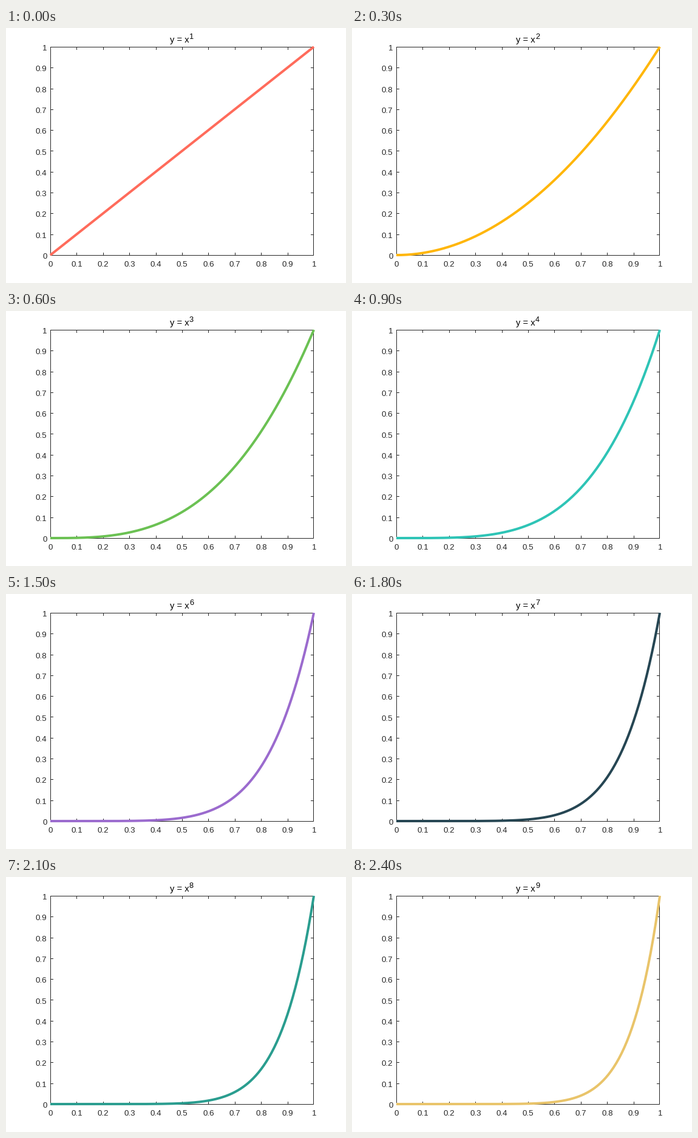
Write a matplotlib script that moves like this. It is 560 px wide and 420 px high and loops after 2.7 s.

```python
import matplotlib.pyplot as plt
import numpy as np
from matplotlib.animation import FuncAnimation

W, H, DPI = 560, 420, 100
PX = 72 / DPI  # points per pixel
LEFT, RIGHT, TOP, BOTTOM = 73, 507, 31, 374
TICK = 4.5
INK = "#262626"
COLORS = ["#ff6b5b", "#ffb60a", "#6bc153", "#2ec4b6", "#508cdc",
          "#9b6bce", "#264653", "#2a9d8f", "#e9c46a"]

plt.rcParams["font.family"] = "Liberation Sans"
fig = plt.figure(figsize=(W / DPI, H / DPI), dpi=DPI, facecolor="white")
ax = fig.add_axes([0, 0, 1, 1])
ax.set_xlim(0, W)
ax.set_ylim(H, 0)
ax.axis("off")


def stroke(xs, ys):
    ax.plot(xs, ys, color=INK, lw=PX, snap=False,
            solid_capstyle="projecting", solid_joinstyle="miter")


def label(x, y, text, size=13.33, color=INK, ha="left"):
    return ax.text(x, y, text, fontsize=size * PX, color=color,
                   ha=ha, va="baseline")


def to_pixels(x, y):
    return LEFT + (RIGHT - LEFT) * x, BOTTOM - (BOTTOM - TOP) * y


# One-pixel strokes run through pixel centres.
x0, x1, y0, y1 = LEFT + 0.5, RIGHT - 0.5, TOP + 0.5, BOTTOM + 0.5
stroke([x0, x1, x1, x0, x0], [y0, y0, y1, y1, y0])
for i in range(11):
    t = i / 10
    x, y = to_pixels(t, t)
    if 0 < i < 10:
        tx, ty = round(x) + 0.5, round(y) + 0.5
        stroke([tx, tx], [y1, y1 - TICK + 0.5])
        stroke([tx, tx], [y0, y0 + TICK - 0.5])
        stroke([x0, x0 + TICK - 0.5], [ty, ty])
        stroke([x1, x1 - TICK + 0.5], [ty, ty])
    label(x + 0.3, 393, f"{t:g}", ha="center")
    label(67.4, y + 6.05, f"{t:g}", ha="right")

label(270.4, 24, "y = x", 14.67, "black")
power = label(302, 18, "", 12.8, "black")

u = np.linspace(0, 1, 201)
curve, = ax.plot([], [], lw=4 * PX, snap=False, solid_capstyle="butt",
                 solid_joinstyle="round", zorder=3)


def update(frame):
    n = frame + 1
    curve.set_data(*to_pixels(u, u ** n))
    curve.set_color(COLORS[frame])
    power.set_text(str(n))
    return curve, power


anim = FuncAnimation(fig, update, frames=len(COLORS), interval=300,
                     repeat=True, repeat_delay=0)
plt.show()
```
